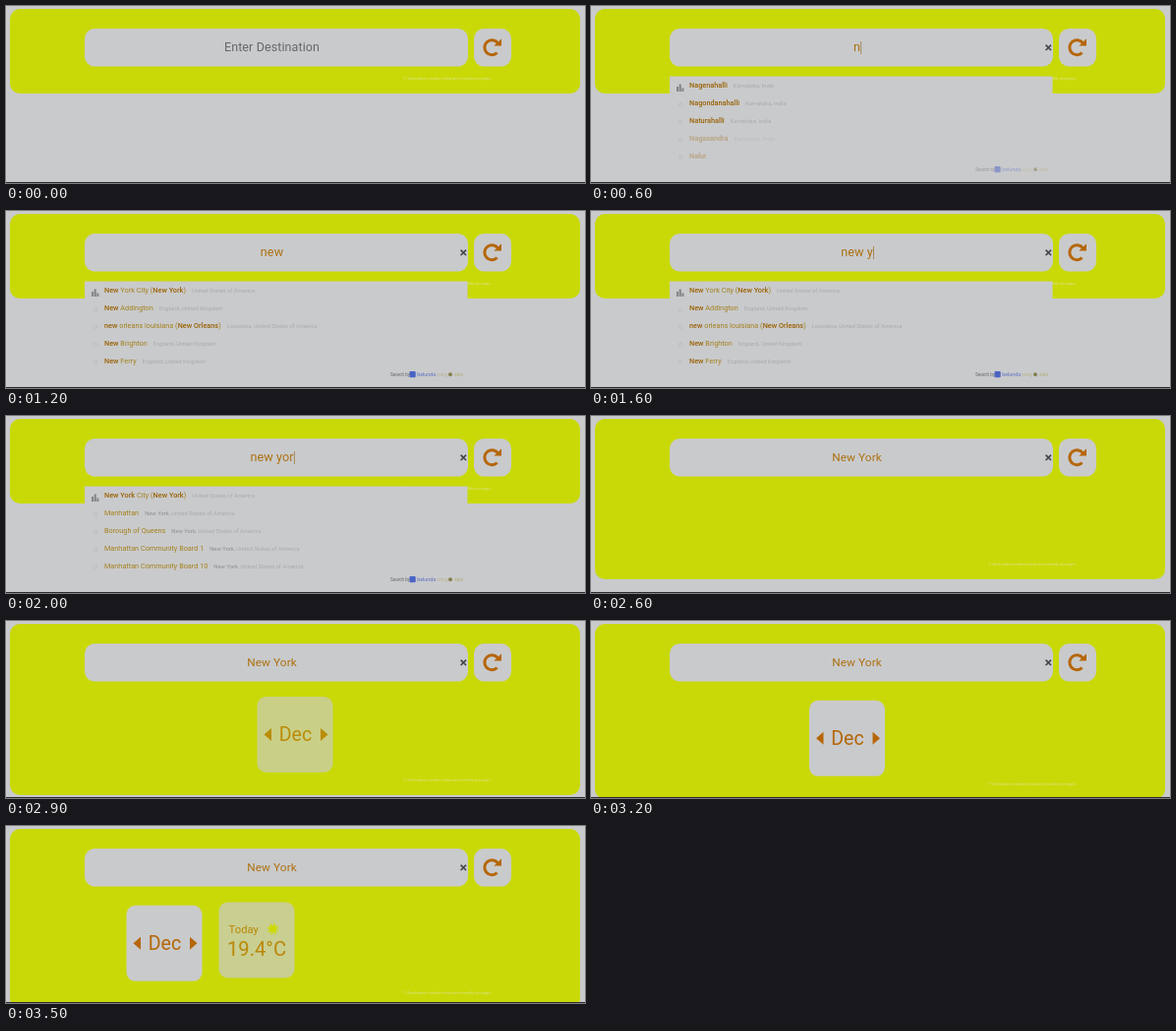
An HTML page for the animation above (3600 ms loop, 589 by 180 pixels).

```html
<!DOCTYPE html>
<html lang="en">
<head>
<meta charset="utf-8">
<title>Destination search</title>
<style>
  html, body { margin: 0; width: 100%; height: 100%; overflow: hidden; background: #c9cacc; }
  svg { display: block; width: 589px; height: 180px; font-family: Roboto, Arial, sans-serif; }
  .surface { fill: #c9cacc; }
  .accent { fill: #b56608; }
  #query { font-size: 12.6px; letter-spacing: .1px; text-anchor: middle; fill: #ad7110; }
  #query.empty { font-size: 12.5px; fill: #66676a; }
  #query.chosen { font-size: 11.8px; }
  .row { font-size: 7.3px; fill: #a3801c; }
  .hit { fill: #9a6204; font-weight: 500; }
  .sub { font-size: 5.8px; fill: #a9aaab; }
  .sub .hit { fill: #8d8e8f; font-weight: 400; }
  #credit { font-size: 4px; text-anchor: end; fill: #dce292; }
  #by { font-size: 4.6px; }
</style>
</head>
<body>
<svg viewBox="0 0 589 180">
  <rect class="surface" width="589" height="180"/>
  <rect id="panel" x="4" y="3" width="580" height="86" rx="10" fill="#c9d907"/>
  <text id="credit" x="493">© Destination weather data and monthly averages</text>

  <rect class="surface" x="80" y="23" width="390" height="38.5" rx="10"/>
  <text id="query" x="270.5" y="46.3"></text>
  <rect id="caret" y="36" width=".8" height="13" fill="#a07a3c"/>
  <path id="clear" d="M462.6 39.6l5.4 5.4m0-5.4l-5.4 5.4" stroke="#45464c" stroke-width="1.7"/>

  <rect class="surface" x="476" y="23" width="38" height="38.5" rx="10"/>
  <path d="M500.3 37.6A7.5 7.5 0 1 0 499.6 47.5" fill="none" stroke="#b56608" stroke-width="3"/>
  <path class="accent" d="M504 33.2V40.6H496.4Z"/>

  <g id="list">
    <rect class="surface" x="80" y="71.5" width="389.5" height="101"/>
    <path d="M87 82h2v5h-2zM89.6 79.5h2.2V87h-2.2zM92.4 83.5h2V87h-2z" fill="#85868a"/>
    <g id="rows"></g>
    <g id="by">
      <text x="391" y="167.8" fill="#66676b">Search by</text>
      <rect x="410.5" y="163" width="6.2" height="6.2" rx="1" fill="#4a63c4"/>
      <text x="418.3" y="168" font-size="5.3" fill="#5c70c2">belunda</text>
      <text x="438" y="167.8" fill="#b9b58f">using</text>
      <circle cx="452" cy="166.2" r="2" fill="#85804f"/>
      <text x="456" y="167.8" fill="#b3ac74">data</text>
    </g>
  </g>

  <g id="month">
    <rect class="surface" width="77" height="77" rx="9"/>
    <path class="accent" d="M14.5 32v13l-7.5-6.5zM64.5 32v13l7.5-6.5z"/>
    <text class="accent" x="39" y="45.3" font-size="19.5" text-anchor="middle">Dec</text>
  </g>
  <g id="today">
    <rect class="surface" width="77" height="77" rx="9"/>
    <text class="accent" x="10" y="31" font-size="11.3">Today</text>
    <circle cx="55" cy="27.3" r="3.7" fill="#cfdc00"/>
    <circle cx="55" cy="27.3" r="4.8" fill="none" stroke="#cfdc00" stroke-width="1.6" stroke-dasharray="1.9 1.87"/>
    <text class="accent" x="8.5" y="54.8" font-size="20.2">19.4°C</text>
  </g>
  <rect y="179" width="589" height="1" fill="#2c2c2e"/>
</svg>
<script>
  const LOOP = 3600, STEP = 100;
  const $ = id => document.getElementById(id);
  const UK = '|England, United Kingdom', US = 'United States of America';
  const KA = '|Karnataka, India', NY = '|*New York*, ' + US;

  // Asterisks mark the matched part, a bar separates the region.
  const cities = [
    ['*Nagenahalli*' + KA, '*Nagondanahalli*' + KA, '*Naturahalli*' + KA,
      '*Nagasandra*' + KA, '*Nalur*'],
    ['*New* York City (*New York*)|' + US, '*New* Addington' + UK,
      '*new* orleans louisiana (*New Orleans*)|Louisiana, ' + US,
      '*New* Brighton' + UK, '*New* Ferry' + UK],
    ['*New York* City (*New York*)|' + US, 'Manhattan' + NY, 'Borough of Queens' + NY,
      'Manhattan Community Board 1' + NY, 'Manhattan Community Board 10' + NY]
  ];
  const typing = [[0, ''], [500, 'n'], [800, 'ne'], [1000, 'new'], [1300, 'new '],
    [1500, 'new y'], [1700, 'new yo'], [1900, 'new yor'], [2300, 'New York']];
  const lists = [[0, -1], [600, 0], [1100, 1], [1700, 2], [2300, -1]];

  const bottom = [[2400, 89], [2500, 138], [2600, 166], [2900, 177], [3500, 185]];
  const monthX = [[3000, 255.5], [3100, 248], [3200, 222], [3300, 185], [3400, 148], [3500, 122.5]];
  const monthFade = [[2700, 0], [2800, .3], [2900, .65], [3000, .9], [3100, 1]];
  const todayFade = [[3300, 0], [3400, .35], [3500, .7]];

  const at = (states, t) => states.filter(s => s[0] <= t).pop()[1];

  function track(keys, t) {
    if (t <= keys[0][0]) return keys[0][1];
    for (let i = 1; i < keys.length; i++) {
      const [t0, a] = keys[i - 1], [t1, b] = keys[i];
      if (t <= t1) return a + (b - a) * (t - t0) / (t1 - t0);
    }
    return keys[keys.length - 1][1];
  }

  const mark = s => s.replace(/\*(.+?)\*/g, '<tspan class="hit">$1</tspan>');

  function rowMarkup(entry, i, ghost) {
    const [name, region] = entry.split('|'), y = 83.4 + 17.8 * i;
    const sub = region ? `<tspan class="sub" dx="6">${mark(region)}</tspan>` : '';
    const pin = i ? `<circle cx="91" cy="${y - 1}" r="1.8" fill="none" stroke="#babbbd" stroke-width=".8"/>` : '';
    return pin + `<text class="row" x="100" y="${y}" opacity="${ghost && i > 2 ? .4 : 1}">${mark(name)}${sub}</text>`;
  }

  function place(id, x, fade) {
    $(id).setAttribute('transform', `translate(${x} ${80.8 - 11 * (1 - fade)})`);
    $(id).setAttribute('opacity', fade);
  }

  function show(id, on) { $(id).style.visibility = on ? 'visible' : 'hidden'; }

  function draw(t) {
    const text = at(typing, t), list = at(lists, t), query = $('query');
    query.textContent = text || 'Enter Destination';
    query.setAttribute('class', !text ? 'empty' : text === 'New York' ? 'chosen' : '');
    show('clear', text);
    show('caret', text && t < 2300 && !(t >= 1000 && t < 1300));
    $('caret').setAttribute('x', 270.5 + query.getComputedTextLength() / 2 + .3);

    show('list', list >= 0);
    const ghost = t < 700;
    $('rows').innerHTML = list < 0 ? '' : cities[list].map((c, i) => rowMarkup(c, i, ghost)).join('');
    $('by').setAttribute('opacity', ghost ? .5 : 1);

    const edge = track(bottom, t), x = track(monthX, t);
    $('panel').setAttribute('height', edge - 3);
    $('credit').setAttribute('y', edge - 14);
    place('month', x, track(monthFade, t));
    place('today', x + 94, track(todayFade, t));
  }

  const start = performance.now();
  let last = -1;
  function tick() {
    const t = Math.floor((performance.now() - start) % LOOP / STEP) * STEP;
    if (t !== last) draw(last = t);
    requestAnimationFrame(tick);
  }
  tick();
</script>
</body>
</html>
```
